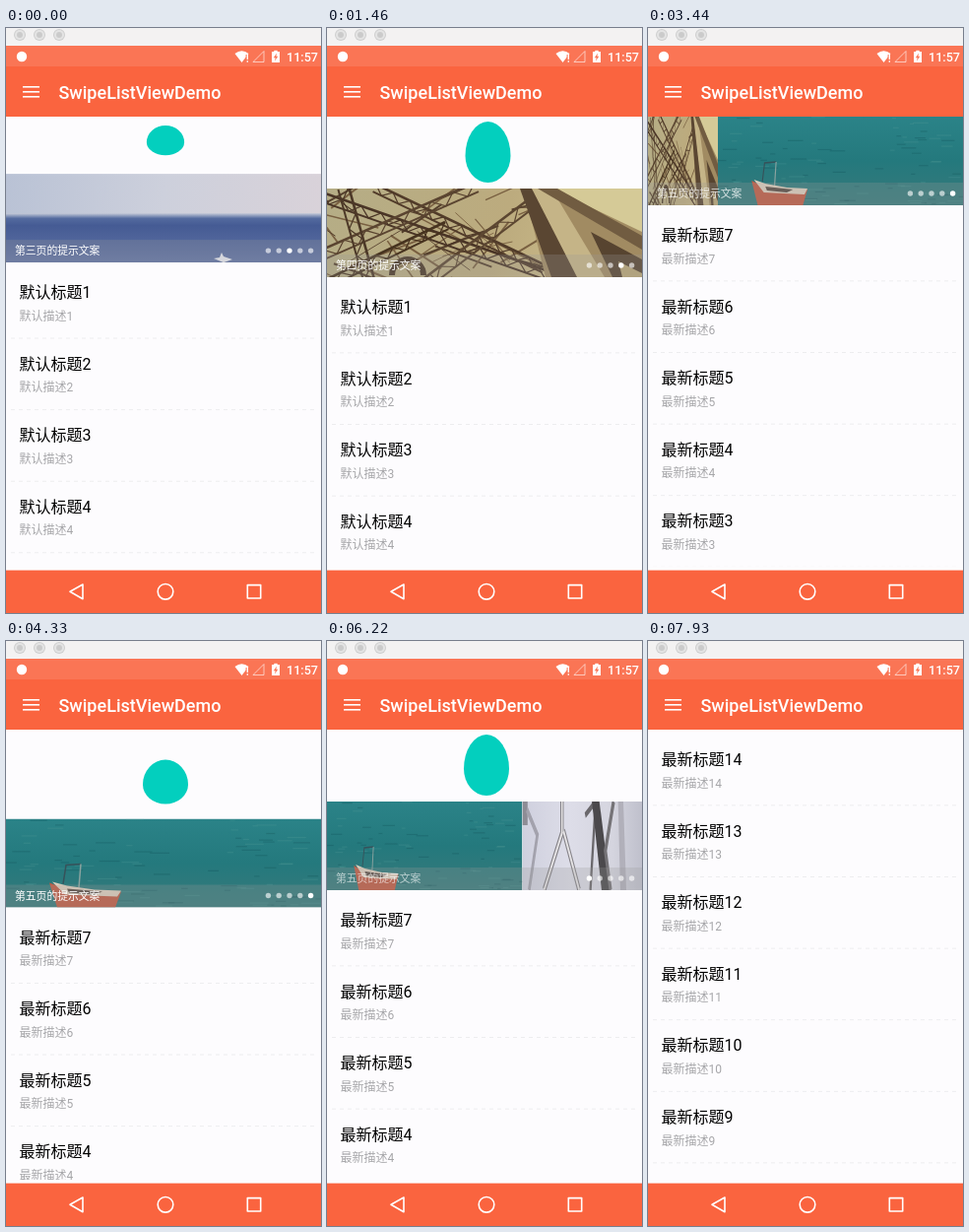
Animation of 320x594 px, one loop 8 s. Source, as an HTML page with a canvas:

```html
<!DOCTYPE html>
<html lang="zh-CN">
<head>
<meta charset="utf-8">
<title>SwipeListViewDemo</title>
<style>
html, body { margin: 0; width: 100%; height: 100%; overflow: hidden; background: #fdfcfe; }
canvas { display: block; width: 320px; height: 594px; }
</style>
</head>
<body>
<canvas id="stage"></canvas>
<script>
const W = 320, H = 594, LOOP = 8000;
const ORANGE = '#fa643f', TEAL = '#03cfbe', WHITE = '#fff', PAPER = '#fdfcfe';
const TOP = 90, BOTTOM = 547, BANNER = 90, ROW = 72.6, REST = 73;
const FONT = 'Roboto, "Noto Sans CJK SC", "Noto Sans CJK", sans-serif';

const canvas = document.getElementById('stage');
const ctx = canvas.getContext('2d');
const dpr = window.devicePixelRatio || 1;
canvas.width = W * dpr;
canvas.height = H * dpr;

const lerp = (a, b, p) => a + (b - a) * p;
const span = (t, start, length) => Math.min(1, Math.max(0, (t - start) / length));
const easeOutSine = p => Math.sin(p * Math.PI / 2);
const easeInOut = p => (1 - Math.cos(p * Math.PI)) / 2;
const easeOutQuint = p => 1 - Math.pow(1 - p, 5);

// Each pull: drag to a peak, release to the resting height, then collapse.
const PULLS = [
  { start: 0, drag: 600, from: 58, peak: 98, release: 700, done: 2600 },
  { start: 3450, drag: 1150, from: 0, peak: 97, release: 4780, done: 6680 }
];
const SETTLE = 475;

const pullAt = t => t < PULLS[1].start ? PULLS[0] : PULLS[1];

function headerHeight(t, pull) {
  if (t < pull.release) return lerp(pull.from, pull.peak, easeOutSine(span(t, pull.start, pull.drag)));
  if (t < pull.done) return lerp(pull.peak, REST, easeInOut(span(t, pull.release, SETTLE)));
  return lerp(REST, 0, easeInOut(span(t, pull.done, SETTLE)));
}

function armedTime(pull) {
  const p = Math.asin((REST - pull.from) / (pull.peak - pull.from)) * 2 / Math.PI;
  return pull.start + p * pull.drag;
}

// ---------- drawing helpers ----------
function rect(x, y, w, h, fill) {
  ctx.fillStyle = fill;
  ctx.fillRect(x, y, w, h);
}

function disc(x, y, r, fill) {
  ctx.fillStyle = fill;
  ctx.beginPath();
  ctx.arc(x, y, r, 0, Math.PI * 2);
  ctx.fill();
}

function tracePath(points) {
  ctx.beginPath();
  points.forEach(([x, y], i) => i ? ctx.lineTo(x, y) : ctx.moveTo(x, y));
}

function poly(points, fill) {
  ctx.fillStyle = fill;
  tracePath(points);
  ctx.closePath();
  ctx.fill();
}

function line(points, color, width, closed) {
  ctx.strokeStyle = color;
  ctx.lineWidth = width;
  tracePath(points);
  if (closed) ctx.closePath();
  ctx.stroke();
}

function text(str, x, y, size, color, weight = 400) {
  ctx.font = `${weight} ${size}px ${FONT}`;
  ctx.fillStyle = color;
  ctx.fillText(str, x, y);
}

function gradient(x0, y0, x1, y1, ...stops) {
  const g = ctx.createLinearGradient(x0, y0, x1, y1);
  stops.forEach(([at, color]) => g.addColorStop(at, color));
  return g;
}

function clipped(x, y, w, h, draw) {
  ctx.save();
  ctx.beginPath();
  ctx.rect(x, y, w, h);
  ctx.clip();
  draw();
  ctx.restore();
}

function seeded(seed) {
  return () => (seed = seed * 16807 % 2147483647) / 2147483647;
}

// Two parallel chords with zigzag bracing between them.
function truss(x0, y0, x1, y1, depth, color) {
  const length = Math.hypot(x1 - x0, y1 - y0);
  const nx = -(y1 - y0) / length * depth, ny = (x1 - x0) / length * depth;
  const bays = Math.round(length / depth / 1.2);
  const brace = Array.from({ length: bays + 1 }, (_, i) =>
    [lerp(x0, x1, i / bays) + nx * (i % 2), lerp(y0, y1, i / bays) + ny * (i % 2)]);
  line(brace, color, 1.2);
  line([[x0, y0], [x1, y1]], color, 2.6);
  line([[x0 + nx, y0 + ny], [x1 + nx, y1 + ny]], color, 2);
}

// ---------- banner pages ----------
function room() {
  rect(0, 0, W, BANNER, gradient(0, 0, W, 0, [0, '#cfd0de'], [0.4, '#dddde8'], [0.75, '#d5d5df'], [1, '#bfc0cc']));
  rect(0, 0, 14, 24, '#8d8c95');
  line([[12, 8], [40, 34], [18, 90]], '#a3a2ad', 7);
  line([[106, 0], [106, 32], [58, 90]], '#858388', 9);
  line([[110, 30], [152, 90]], '#858388', 9);
  line([[106, 0], [106, 32], [58, 90]], '#e6e4e6', 4);
  line([[110, 30], [152, 90]], '#e6e4e6', 4);
  line([[168, 14], [196, 0], [182, 90]], '#6a686c', 6);
  poly([[186, 0], [206, 0], [236, 90], [212, 90]], '#4b494c');
  line([[244, 0], [222, 50], [236, 90]], '#757377', 8);
  poly([[256, 0], [270, 0], [278, 90], [262, 90]], '#b1b0ba');
}

function sea() {
  rect(0, 0, W, 43, gradient(0, 0, W, 43, [0, '#b9c2d5'], [0.5, '#cdd0dc'], [1, '#d9d2d9']));
  rect(0, 43, W, 47, gradient(0, 43, 0, 90, [0, '#586fa2'], [0.2, '#455b94'], [1, '#6274a5']));
  rect(0, 40, W, 5, gradient(0, 40, 0, 45, [0, '#c5cad8'], [1, '#586fa2']));
  poly([[211, 86], [217, 85], [219, 80], [221, 84], [230, 87], [221, 90]], '#e9ebf2');
}

function girders() {
  rect(0, 0, W, BANNER, gradient(0, 0, W, 90, [0, '#b5ad86'], [0.55, '#bcab7e'], [1, '#d3c490']));
  const rnd = seeded(71);
  for (let i = 0; i < 34; i++) {
    const x = rnd() * 230 - 30, y = rnd() * 90;
    const dx = 30 + rnd() * 50, dy = (i % 2 ? 1 : -1) * (12 + rnd() * 40);
    line([[x, y], [x + dx, y + dy]], i % 3 ? '#796041' : '#55402d', 0.8 + rnd() * 1.4);
  }
  truss(-5, 4, 225, 84, 9, '#4a3526');
  truss(50, -4, 222, 78, 8, '#513b29');
  truss(-5, 62, 150, -6, 10, '#5a4430');
  truss(95, 94, 214, 4, 10, '#5c4631');
  truss(-4, 94, 120, 34, 8, '#47331f');
  truss(22, -2, 48, 92, 11, '#4c3827');
  ctx.strokeStyle = '#4a3827';
  ctx.lineWidth = 6;
  ctx.beginPath();
  ctx.arc(82, 88, 16, Math.PI, 0);
  ctx.stroke();

  poly([[200, 0], [320, 0], [320, 90], [222, 90]], '#a18b62');
  poly([[228, 0], [320, 0], [320, 44]], '#d5ca97');
  poly([[206, 0], [228, 0], [282, 90], [252, 90]], '#c5b487');
  poly([[196, 0], [208, 0], [254, 90], [228, 90]], '#5a4632');
  poly([[214, 0], [234, 0], [320, 48], [320, 62]], '#715c41');
  poly([[268, 44], [320, 72], [320, 90], [290, 90]], '#574430');
  poly([[296, 74], [320, 86], [320, 90], [300, 90]], '#b9a677');
}

function boat() {
  rect(0, 0, W, BANNER, gradient(0, 0, 0, 90, [0, '#2b8388'], [0.5, '#24797d'], [1, '#37797a']));
  const rnd = seeded(19);
  for (let i = 0; i < 90; i++) {
    rect(rnd() * W, rnd() * 88, 5 + rnd() * 16, 1.2, i % 2 ? 'rgba(85,155,152,.28)' : 'rgba(15,75,82,.28)');
  }
  line([[58, 66], [61, 47], [76, 46]], '#36525a', 1.5);
  line([[74, 70], [76, 46]], '#8aa3a0', 1.5);
  poly([[44, 65], [60, 71], [90, 74], [117, 74], [111, 90], [52, 90]], '#c05a43');
  poly([[47, 64], [62, 68], [90, 72], [117, 73], [113, 79], [60, 77]], '#ddcfbd');
  poly([[62, 71], [98, 74], [90, 77], [64, 75]], '#584a43');
}

const PAGES = [room, null, sea, girders, boat];
const TIPS = [...'一二三四五'].map(n => `第${n}页的提示文案`);
const TURN = { first: 468, every: 2856, length: 450 };

// Pages squeeze against the stage edges instead of sliding.
function page(index, x, width) {
  if (width < 0.1) return;
  clipped(x, 0, width, BANNER, () => {
    ctx.translate(x, 0);
    ctx.scale(width / W, 1);
    PAGES[index]();
  });
}

function banner(t, y) {
  const turns = Math.floor((t - TURN.first) / TURN.every);
  const current = (3 + turns) % 5;
  const previous = (current + 4) % 5;
  const p = turns < 0 ? 1 : easeOutQuint(span(t, TURN.first + turns * TURN.every, TURN.length));

  ctx.save();
  ctx.translate(0, y);
  const split = W * (1 - p);
  if (p < 1) page(previous, 0, split);
  page(current, split, W - split);

  rect(0, 67, W, 23, 'rgba(150,150,150,.25)');
  ctx.globalAlpha = Math.max(p, 1 - p);
  text(TIPS[p > 0.5 ? current : previous], 9, 82.3, 10.8, WHITE);
  ctx.globalAlpha = 1;
  for (let i = 0; i < 5; i++) {
    disc(266.4 + i * 10.8, 78, 2.7, i === current ? WHITE : 'rgba(255,255,255,.62)');
  }
  ctx.restore();
}

// ---------- refresh figure ----------
// Width, and distances of the top and bottom edge above the banner.
const POSES = [[48, 53, 15], [47, 57, 15], [46, 60, 15], [46, 64, 10], [46, 68, 6]];
const SWAY = [0, 1, 1.5, 1, 0, -1, -1.5, -1];

function figure(t, pull, y, height) {
  if (height <= 0) return;
  const armed = armedTime(pull);
  let width, top, bottom, x = 162;
  if (t < armed) {
    const s = height / REST;
    width = 48 * s;
    top = 34 + 19 * s;
    bottom = 34 - 19 * s;
  } else {
    [width, top, bottom] = POSES[Math.min(4, Math.floor((t - armed) / 90))];
    if (t > pull.release && t < pull.done) x += SWAY[Math.floor((t - pull.release) / 70) % 8];
  }
  const mid = y - lerp(bottom, top, 0.44);
  ctx.fillStyle = TEAL;
  ctx.beginPath();
  ctx.ellipse(x, mid, width / 2, mid - y + top, 0, Math.PI, 0);
  ctx.ellipse(x, mid, width / 2, y - bottom - mid, 0, 0, Math.PI);
  ctx.fill();
}

// ---------- list ----------
function itemName(i, fresh) {
  return i < fresh ? ['最新', fresh - i] : ['默认', i - fresh + 1];
}

function list(t, y) {
  const fresh = t < PULLS[0].done ? 0 : t < PULLS[1].done ? 7 : 14;
  for (let i = 0; i < 8; i++) {
    const top = y + 4.5 + i * ROW;
    if (top > BOTTOM) break;
    const [kind, n] = itemName(i, fresh);
    text(`${kind}标题${n}`, 13.5, top + 31.5, 16, '#000');
    text(`${kind}描述${n}`, 13.5, top + 54, 12, '#a6a6a9');
    ctx.setLineDash([4, 4]);
    line([[5, top + 72.4], [315, top + 72.4]], '#ededef', 1);
    ctx.setLineDash([]);
  }
}

// ---------- fixed bars ----------
function statusBar() {
  rect(0, 0, W, 18, '#f3f2f2');
  for (const x of [14, 34, 54]) {
    disc(x, 7, 6, '#cfcfcf');
    disc(x, 7, 5, '#e4e4e4');
    disc(x, 7, 3, '#cbcbcb');
  }
  rect(0, 18, W, 21, '#fa7555');
  disc(16, 29, 5.2, WHITE);

  ctx.fillStyle = WHITE;
  ctx.beginPath();
  ctx.moveTo(239.5, 35);
  ctx.lineTo(232.5, 26);
  ctx.quadraticCurveTo(239.5, 20.5, 246.5, 26);
  ctx.fill();
  rect(243.6, 27, 3.4, 8, '#fa7555');
  rect(244.6, 27, 1.4, 5, WHITE);
  rect(244.6, 33.2, 1.4, 1.5, WHITE);

  line([[251, 34.5], [262, 34.5], [262, 23.5]], 'rgba(255,255,255,.6)', 1, true);
  rect(270, 24, 8, 11, WHITE);
  rect(272.3, 22.8, 3.4, 1.5, WHITE);
  poly([[275, 25.5], [271.8, 30.2], [273.7, 30.2], [273, 33.5], [276.3, 28.7], [274.4, 28.7]], '#fa7555');
  text('11:57', 285, 34, 12.6, WHITE, 500);
}

function toolbar() {
  rect(0, 39, W, 51, ORANGE);
  for (const y of [59, 64, 69]) rect(17, y, 17, 1.6, WHITE);
  text('SwipeListViewDemo', 53.5, 71.5, 18, WHITE, 500);
}

function navBar() {
  rect(0, 550.6, W, H - 550.6, ORANGE);
  ctx.lineJoin = 'round';
  line([[65, 572.3], [78, 565], [78, 579.8]], WHITE, 1.6, true);
  ctx.beginPath();
  ctx.arc(162, 572.3, 7.8, 0, Math.PI * 2);
  ctx.stroke();
  ctx.strokeRect(245.3, 565.6, 13.4, 13.4);
  ctx.lineJoin = 'miter';
}

// ---------- frame ----------
function render(t) {
  ctx.setTransform(dpr, 0, 0, dpr, 0, 0);
  rect(0, 0, W, H, PAPER);

  const pull = pullAt(t);
  const height = headerHeight(t, pull);
  const scroll = BANNER * easeInOut(span(t, 7300, 400));
  const y = TOP + height - scroll;
  clipped(0, TOP, W, BOTTOM - TOP, () => {
    figure(t, pull, y, height);
    banner(t, y);
    list(t, y + BANNER);
  });

  statusBar();
  toolbar();
  navBar();
}

const start = performance.now();
function tick() {
  render((performance.now() - start) % LOOP);
  requestAnimationFrame(tick);
}
tick();
</script>
</body>
</html>
```
